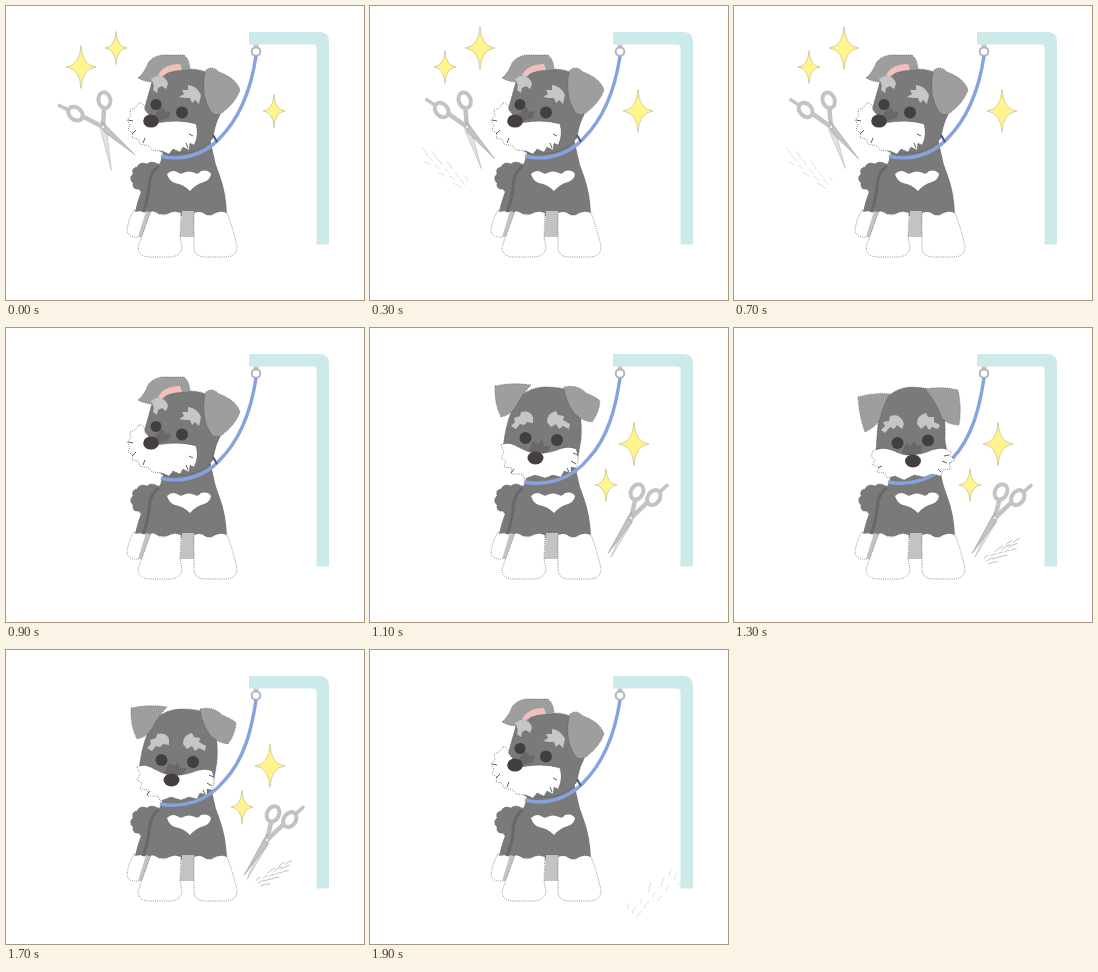
Animation of 358 by 294 pixels, one loop 2 s. Source, as an HTML page:

```html
<!DOCTYPE html>
<html lang="en">
<head>
<meta charset="utf-8">
<title>Dog grooming</title>
<style>
html, body { margin: 0; width: 100%; height: 100%; overflow: hidden; background: #fff; }
svg { display: block; width: 100%; height: 100%; }
.edge { stroke: #444; stroke-width: .6; stroke-dasharray: 1 1.2; }
.coat { fill: #7a7a7a; }
.ear { fill: #9e9e9e; }
.brow { fill: #c6c6c6; }
.white { fill: #fff; }
.dark { fill: #443e40; }
.shade { fill: #686868; }
.steel { fill: #c3c3c3; }
.line { fill: none; stroke: #c3c3c3; stroke-linecap: round; }
.star { fill: #fff58c; stroke: #b9b27a; stroke-width: .6; }
.tick { fill: none; stroke: #4a4a4a; stroke-width: .9; }
.leash { fill: none; stroke: #86a3de; stroke-width: 3.4; }
</style>
</head>
<body>
<svg viewBox="0 0 358 294">
  <path fill="#cdeaea" d="M243 26H314Q323 26 323 36V238.5H310.5V42Q310.5 38.5 307 38.5H243Z"/>
  <path d="M247.500 38.500h5v4h-5z" fill="#c5c5c5"/>
  <circle cx="250" cy="45.500" r="4.300" fill="none" stroke="#b5b5b5" stroke-width="2"/>

  <g id="body">
    <path class="coat edge" d="M152 158Q145 154 141 158Q134 155 131 161Q125 162 127 168Q122 172 127 177Q126 184 133 183Q135 188 141 186L150 175Z"/>
    <path class="white edge" d="M128 204L141 205L133 231Q122 232 121 225Q122 214 128 204Z"/>
    <path class="coat" d="M154 157Q140 166 137 181Q132 192 129 206Q136 204 141 207L175 210H188L221 208Q220 186 214 170Q209 158 207 146L204 132L160 138Z"/>
    <path d="M153 160Q144 165 143 181Q142 194 137 206" fill="none" stroke="#686868" stroke-width="3"/>
    <path class="steel" d="M140 205L147 207L136 231H132Z"/>
    <path class="steel" d="M176 205H188V231H174Z"/>
    <path class="white edge" d="M145 205Q149 205 153 208Q158 210 163 207Q169 204 175 207L174 231L176 242Q174 251 163 251H144Q132 251 132 241Z"/>
    <path class="white edge" d="M188 207Q194 204 199 208Q204 211 209 207Q216 204 221 207Q226 219 231 240Q231 251 219 251H200Q188 251 188 241Z"/>
    <path class="white" d="M161 168Q166 163 171 166Q175 169 177 167Q183 164 189 167Q192 169 195 165Q202 163 205 168Q204 174 198 176Q190 178 184 185Q177 178 169 177Q163 175 161 168Z"/>
  </g>

  <path class="leash" id="leash"/>

  <g id="left">
    <path class="coat edge" d="M147 72Q160 65 180 63Q197 62 206 70Q216 92 214 109Q209 118 207 132Q196 145 180 147H157Q136 135 138 104Z"/>
    <path class="ear edge" d="M132 72Q139 66 142 57Q147 50 156 49H178Q184 54 184 64Q171 64 161 67Q156 75 147 76Q139 76 132 72Z"/>
    <path fill="#f3bfbd" d="M152 69Q158 58 174 58L176 64Q163 64 155 71Z"/>
    <path class="ear edge" d="M200 64Q206 59 213 66Q230 72 234 84Q230 96 216 107Q210 110 206 107Q199 97 198 85Q197 72 200 64Z"/>
    <path class="brow" d="M145 73L150 70Q160 69 162 78L160 83L156 80L152 82L151 87L147 84Q149 79 145 73Z"/>
    <path class="brow" d="M173 91L178 88L176 84L182 84L182 79Q191 80 195 89L193 98L189 94L186 97L184 92L179 92Z"/>
    <path class="shade" d="M156 101L160 106L165 105L163 112L152 115L149 108Z"/>
    <circle class="dark" cx="150" cy="98.500" r="5.500"/>
    <circle class="dark" cx="176" cy="106.500" r="6"/>
    <path class="white edge" d="M133 97Q138 96 139 104L143 109L151 117Q173 113 190 118Q193 130 188 139L184 137L183 144L177 141L174 146L167 143L163 148L156 145L146 144L143 140L134 138L132 133L126 132L127 127L122 124L124 119L121 114L125 110L124 104L129 102Z"/>
    <path class="tick" d="M122 114l5 1M126 128l4-4M137 137l2-5M182 142l-2-5M187 130l-4-2"/>
    <ellipse class="dark" cx="145" cy="115" rx="7.800" ry="6.600"/>
    <path d="M207 129L211 136" stroke="#46598a" stroke-width="2"/>
  </g>

  <g id="mid">
    <path class="coat edge" d="M142 82Q149 62 172 59Q195 58 206 66Q213 91 211 112Q209 124 207 134Q194 145 170 147L150 143L133 121Q135 98 142 82Z"/>
    <path class="ear edge" d="M125 58Q143 54 161 57Q155 63 149 73Q143 87 131 89Q124 75 125 58Z"/>
    <path class="ear edge" d="M194 59Q208 56 216 65Q228 70 230 73Q229 85 222 94Q208 92 202 82Q195 70 194 59Z"/>
    <path class="brow" d="M141 98L145 94L144 90L150 88L151 84Q160 82 163 89L163 95L157 94L154 97L150 96L146 101Z"/>
    <path class="brow" d="M177 94Q177 85 186 83L188 87L194 88L193 92L200 96L199 101L193 98L189 101L186 96L181 99Z"/>
    <path class="shade" d="M160 119L163 113L168 116L172 112L174 118L181 118L175 127H158Z"/>
    <circle class="dark" cx="155.500" cy="110" r="6"/>
    <circle class="dark" cx="187" cy="112" r="6"/>
    <path class="white edge" d="M131 117Q139 113 148 119Q157 124 166 126Q181 125 190 121Q199 118 206 121Q210 131 206 140L201 139L201 145L194 143L191 149L183 147L175 150L165 147L154 151L152 146L141 146L142 140L134 139L136 133L131 130L134 124Z"/>
    <path class="tick" d="M208 127l-5-2M206 136l-5-3M199 144l-2-4M141 145l3-4"/>
    <ellipse class="dark" cx="165.500" cy="130" rx="8" ry="6.500"/>
  </g>

  <g id="front">
    <path class="coat edge" d="M145 86Q150 62 176 59Q198 59 208 68Q212 90 211 112Q214 126 211 134Q195 146 170 147L146 141L142 122Q143 104 145 86Z"/>
    <path class="ear edge" d="M124 69Q140 64 156 66Q149 77 146 91Q142 99 131 104Q125 88 124 69Z"/>
    <path class="ear edge" d="M191 61Q209 58 224 62Q228 80 225 97Q214 97 208 90Q203 75 191 61Z"/>
    <path class="brow" d="M147 102L151 98L149 94L155 93L156 88Q167 85 170 96L168 101L163 97L160 101L156 99L151 105Z"/>
    <path class="brow" d="M183 96Q183 87 192 85L194 89L200 89L200 94L206 97L204 101L198 99L195 102L192 97L187 101Z"/>
    <path class="shade" d="M169 121L173 115L177 118L180 113L183 118L188 117L187 125L178 128L168 126Z"/>
    <circle class="dark" cx="163.500" cy="115" r="6"/>
    <circle class="dark" cx="194" cy="112.500" r="6"/>
    <path class="white edge" d="M139 123Q149 118 160 123Q169 128 179 127Q190 126 198 122Q211 118 217 124L216 128L221 132L215 135L217 141L209 142L207 148L198 146L190 149L180 147L170 152L161 148L153 150L151 145L143 144L145 139L138 137L141 132L137 128Z"/>
    <path class="tick" d="M215 127l-5 1M213 135l-5-2M207 144l-3-3M144 140l4-2"/>
    <ellipse class="dark" cx="179" cy="133" rx="8" ry="6.500"/>
  </g>

  <g id="fx"></g>
</svg>
<script>
const STEP = 100, STEPS = 20;
const LEASH_LEFT = 'M250 50C246 77 236 110 213 133C197 150 173 155 155 150';
const LEASH_FRONT = 'M250 50C246 77 239 109 218 131C201 152 176 158 154 154';

const fx = document.getElementById('fx');
const leash = document.getElementById('leash');
const heads = ['left', 'mid', 'front'].map(id => document.getElementById(id));

function star(x, y, rx, ry) {
  const a = rx * .07, b = ry * .07;
  return `<path class="star" d="M${x} ${y - ry}Q${x + a} ${y - b} ${x + rx} ${y}Q${x + a} ${y + b} ${x} ${y + ry}Q${x - a} ${y + b} ${x - rx} ${y}Q${x - a} ${y - b} ${x} ${y - ry}Z"/>`;
}

const sparkle = (x, y, big) => big ? star(x, y, 15, 21.5) : star(x, y, 11, 16.5);

// Blades point along +x before rotation about the pivot.
function scissors(x, y, flip, spread) {
  return `<g transform="translate(${x} ${y}) scale(${flip} 1)">
    <g transform="rotate(${60 + spread})">
      <path fill="#e2e2e2" stroke="#bcbcbc" stroke-width=".6" d="M-5 -2.500L4 -3L44 0L2 3Z"/>
      <path class="line" stroke-width="4.500" d="M0 0L-18 -4.500"/>
      <ellipse class="line" stroke-width="4" cx="-26" cy="-6.500" rx="8" ry="6"/>
    </g>
    <g transform="rotate(${60 - spread})">
      <path class="steel" stroke="#999" stroke-width=".5" d="M-5 -3L2 -3L42 0L4 3Z"/>
      <path class="line" stroke-width="4.500" d="M0 0L-21 5"/>
      <ellipse class="line" stroke-width="4" cx="-29.500" cy="8" rx="8" ry="6"/>
      <path class="line" stroke-width="3.500" d="M-38 10L-47 12.500"/>
    </g>
    <circle r="2" fill="#eee" stroke="#999" stroke-width=".6"/>
  </g>`;
}

// Hair leaves the blade tips as a slanted band that widens, falls and fades.
function clippings(x, y, flip, stage) {
  if (!stage) return '';
  const count = 14;
  let d = '';
  for (let i = 0; i < count; i++) {
    const u = i / (count - 1), jitter = i * 7 % 5 - 2;
    const px = 4 * stage + u * (12.5 * stage + 4);
    const py = 2.7 * stage * stage - 4 - u * (12.5 * stage - 7) + jitter * stage;
    const a = (15 - 20 * stage + jitter * 6) * Math.PI / 180;
    const len = 6 + i % 3 * 2;
    const dx = len * Math.cos(a), dy = len * Math.sin(a);
    d += `M${px} ${py}q${dx * .5 - 1} ${dy * .5 - 1} ${dx} ${dy}`;
  }
  const tone = stage < 3 ? '#b8b8b8' : '#dcdcdc';
  return `<path transform="translate(${x} ${y}) scale(${flip} 1)" d="${d}" fill="none" stroke="${tone}" stroke-width=".9"/>`;
}

function draw(n) {
  const shut = n % 2 === 1;
  const pose = n < 10 || n === 19 ? 0 : n < 12 || n > 16 ? 1 : 2;
  heads.forEach((h, i) => h.setAttribute('display', i === pose ? 'inline' : 'none'));
  leash.setAttribute('d', pose ? LEASH_FRONT : LEASH_LEFT);

  let out = '';
  if (n < 8) {
    out += sparkle(75, 61, !shut) + sparkle(110, 42, shut) + sparkle(268, 105, shut);
    out += scissors(97, 121, 1, shut ? 11 : 19);
  }
  if (n > 10 && n < 19) {
    out += sparkle(264, 116, shut) + sparkle(236, 157, !shut);
    out += scissors(261, 190, -1, shut ? 3 : 12);
  }
  if (n < 9) out += clippings(110, 161, -1, n < 5 ? n : n > 5 ? n - 4 : 0);
  if (n > 11) out += clippings(242, 228, 1, n % 4 + 1);
  fx.innerHTML = out;
}

let last = -1;
function tick() {
  const n = Math.floor(performance.now() / STEP) % STEPS;
  if (n !== last) draw(last = n);
  requestAnimationFrame(tick);
}
tick();
</script>
</body>
</html>
```
